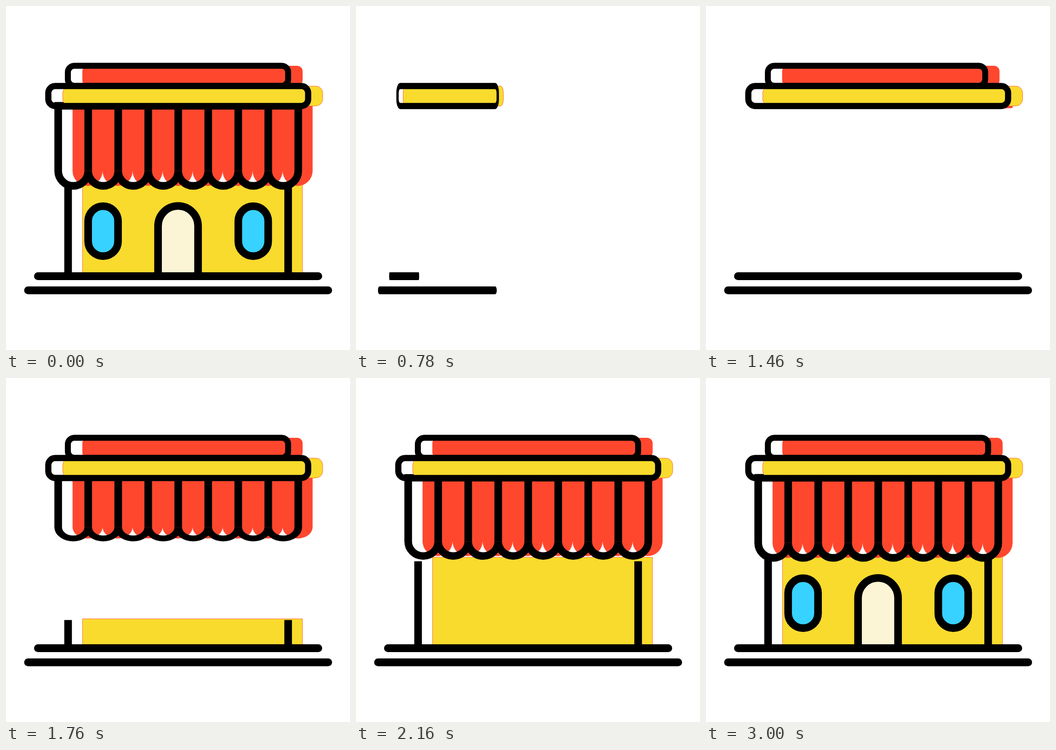
An HTML page for the animation above (3.04 s loop, 748x748 px).

```html
<!DOCTYPE html>
<html lang="en">
<head>
<meta charset="utf-8">
<title>Shop</title>
<style>
  html, body { margin: 0; width: 100%; height: 100%; overflow: hidden; background: #fff; }
  svg { display: block; width: 100%; height: 100%; }

  .ink { fill: none; stroke: #000; stroke-width: 16.6; }
  .bar { stroke-width: 13.4; }
  .red { fill: #ff472e; }
  .yellow { fill: #f9db2d; stroke: #ff472e; stroke-width: .8; vector-effect: non-scaling-stroke; }
  .blue { fill: #37d2ff; }
  .cream { fill: #fbf5d5; }

  /* Each part grows along one axis from its own origin. */
  .wide { --from: 0 1; }
  .tall { --from: 1 0; }
  .wide, .tall { animation: 3040ms infinite; }

  .base, .sign { animation-name: base; animation-timing-function: cubic-bezier(.36, .9, .7, 1); }
  .base { transform-origin: 53px 0; }
  .sign { transform-origin: 89.2px 0; }
  .step { animation-name: step; animation-timing-function: cubic-bezier(.36, .9, .7, 1); transform-origin: 73.4px 0; }
  .roof { animation-name: roof; animation-timing-function: cubic-bezier(.33, 1, .68, 1); transform-origin: 133px 0; }
  .awning { animation-name: awning; animation-timing-function: cubic-bezier(.22, 1, .36, 1); transform-origin: 0 217px; }
  .wall { animation-name: wall; animation-timing-function: cubic-bezier(.25, 1, .5, 1); transform-origin: 0 579px; }
  .windows { animation-name: windows; animation-timing-function: cubic-bezier(.33, 1, .68, 1); transform-origin: 0 489.5px; }
  .door { animation-name: door; animation-timing-function: cubic-bezier(.36, .9, .7, 1); transform-origin: 0 580px; }

  @keyframes base {
    0% { scale: 1 1; animation-timing-function: step-end; }
    8.55%, 20.72% { scale: var(--from); }
    48.68%, 100% { scale: 1 1; }
  }
  @keyframes step {
    0% { scale: 1 1; animation-timing-function: step-end; }
    8.55%, 24.7% { scale: var(--from); }
    47.73%, 100% { scale: 1 1; }
  }
  @keyframes roof {
    0% { scale: 1 1; animation-timing-function: step-end; }
    8.55%, 32.89% { scale: var(--from); }
    52.63%, 100% { scale: 1 1; }
  }
  @keyframes awning {
    0% { scale: 1 1; animation-timing-function: step-end; }
    8.55%, 47.76% { scale: var(--from); }
    89.21%, 100% { scale: 1 1; }
  }
  @keyframes wall {
    0% { scale: 1 1; animation-timing-function: step-end; }
    8.55%, 55.99% { scale: var(--from); }
    80.3%, 100% { scale: 1 1; }
  }
  @keyframes windows {
    0% { scale: 1 1; animation-timing-function: step-end; }
    8.55%, 73.03% { scale: var(--from); }
    91.45%, 100% { scale: 1 1; }
  }
  @keyframes door {
    0% { scale: 1 1; animation-timing-function: step-end; }
    8.55%, 86.84% { scale: var(--from); }
    98.68%, 100% { scale: 1 1; }
  }
</style>
</head>
<body>
<svg viewBox="0 0 748 748">
  <defs>
    <path id="arc" d="M0 0a32.625 32.625 0 0 1-65.25 0"/>
    <path id="canopy" d="M113.5 217H635.5V358.5
      a32.625 32.625 0 0 1-65.25 0a32.625 32.625 0 0 1-65.25 0
      a32.625 32.625 0 0 1-65.25 0a32.625 32.625 0 0 1-65.25 0
      a32.625 32.625 0 0 1-65.25 0a32.625 32.625 0 0 1-65.25 0
      a32.625 32.625 0 0 1-65.25 0a32.625 32.625 0 0 1-65.25 0Z"/>
    <rect id="pane" y="435.3" width="65" height="108.6" rx="32.5"/>
  </defs>

  <g class="wall tall">
    <rect class="yellow" x="166.4" y="385" width="478.2" height="195"/>
    <path class="ink" d="M135 394V587M613.5 394V587"/>
  </g>

  <g class="awning tall">
    <use href="#canopy" class="red" x="31.2"/>
    <use href="#canopy" class="ink"/>
    <path class="ink" d="M178.75 217V358.5M244 217V358.5M309.25 217V358.5M374.5 217V358.5M439.75 217V358.5M505 217V358.5M570.25 217V358.5"/>
  </g>

  <g class="roof wide">
    <rect class="red" x="166" y="130" width="479" height="43.5" rx="12"/>
    <rect class="ink bar" style="stroke-width:13" x="134.5" y="130" width="479" height="43.5" rx="14"/>
  </g>

  <g class="sign wide">
    <rect class="yellow" x="123.4" y="174.2" width="565.2" height="43.2" rx="15"/>
    <rect class="ink bar" x="92" y="174" width="565" height="43.5" rx="15"/>
  </g>

  <g class="windows tall">
    <use href="#pane" class="blue ink" style="fill:#37d2ff" x="178.6"/>
    <use href="#pane" class="blue ink" style="fill:#37d2ff" x="505.1"/>
  </g>

  <g class="door tall">
    <path class="ink" style="fill:#fbf5d5" d="M330.6 588V478.3a43.5 43.5 0 0 1 87 0V588"/>
  </g>

  <rect class="step wide" x="61" y="579" width="626.5" height="17" rx="8.5"/>
  <rect class="base wide" x="39.5" y="609.7" width="669.5" height="17" rx="8.5"/>
</svg>
</body>
</html>
```
